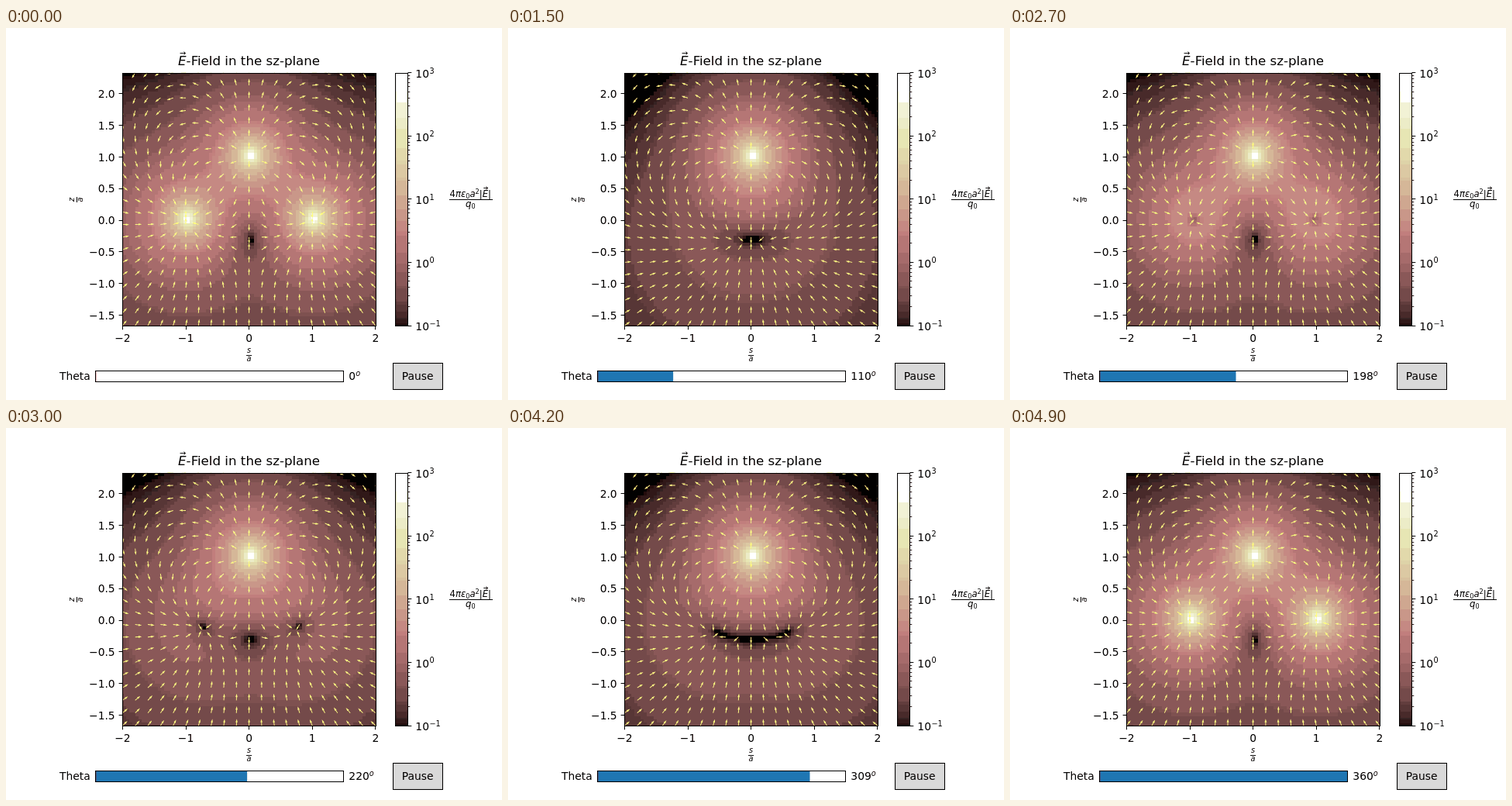
Animation, 640 px wide and 480 px high, one loop 5000 ms. Source, as an HTML page with a canvas:

```html
<!DOCTYPE html>
<html lang="en">
<head>
<meta charset="utf-8">
<title>E-Field in the sz-plane</title>
<style>
html, body { margin: 0; width: 640px; height: 480px; overflow: hidden; background: #fff }
canvas { display: block }
</style>
</head>
<body>
<canvas id="stage" width="640" height="480"></canvas>
<script>
const c = document.getElementById('stage').getContext('2d', { willReadFrequently: true });
const LEFT = 150.4, TOP = 57.6, SIZE = 326.4, BOTTOM = 384, UNIT = 81.6;
const STEPS = 50, NODES = 80, ARROWS = 21, Z0 = -5 / 3;
const FONT = '"DejaVu Sans", sans-serif';
const sx = s => LEFT + (s + 2) * UNIT;
const zy = z => BOTTOM - (z - Z0) * UNIT;
const clamp = v => Math.min(1, Math.max(0, v));

// Field of +1 at z=1 and -1 at x=+-1, projected on the plane turned by theta.
function field(s, z, theta) {
  let es = 0, ez = 0;
  const u = Math.cos(theta), v = Math.sin(theta);
  for (const [q, cs, cy, cz] of [[1, 0, 0, 1], [-1, u, v, 0], [-1, -u, -v, 0]]) {
    const ds = s - cs, dz = z - cz;
    const k = q / Math.pow(ds * ds + cy * cy + dz * dz, 1.5);
    es += k * ds;
    ez += k * dz;
  }
  return [es, ez];
}

// Pink colour map: root of a blend of grey and hot.
const pink = Array.from({ length: 256 }, (_, i) => {
  const x = i / 255;
  const hot = [0.0416 + 2.625 * x, 2.625 * (x - 0.365), (x - 0.746) / 0.254];
  return `rgb(${hot.map(h => Math.round(255 * Math.sqrt((2 * x + clamp(h)) / 3)))})`;
});
const shade = x => pink[Math.min(255, Math.floor(clamp(x) * 256))];

function text(str, x, y, size = 13.89, align = 'left', style = '') {
  c.font = `${style} ${size}px ${FONT}`;
  c.textAlign = align;
  c.fillStyle = '#000';
  c.fillText(str, x, y);
  return c.measureText(str).width;
}

function line(x1, y1, x2, y2, width = 1.11, color = '#000') {
  c.strokeStyle = color;
  c.lineWidth = width;
  c.beginPath();
  c.moveTo(x1, y1);
  c.lineTo(x2, y2);
  c.stroke();
}

function frame(x1, y1, x2, y2) {
  c.strokeStyle = '#000';
  c.lineWidth = 1.11;
  c.strokeRect(x1 + 0.5, y1 + 0.5, x2 - x1, y2 - y1);
}

function vector(x, y, length) {
  line(x, y, x + length, y, 0.9);
  line(x + length - 2.2, y - 2, x + length, y, 0.9);
  line(x + length - 2.2, y + 2, x + length, y, 0.9);
}

function heatmap(theta) {
  const step = 4 / (NODES - 1), px = step * UNIT;
  for (let j = 0; j < NODES - 1; j++) {
    const y1 = Math.round(BOTTOM - (j + 1) * px), y2 = Math.round(BOTTOM - j * px);
    for (let i = 0; i < NODES - 1; i++) {
      const x1 = Math.round(LEFT + i * px), x2 = Math.round(LEFT + (i + 1) * px);
      const e = Math.hypot(...field(-2 + i * step, Z0 + j * step, theta));
      c.fillStyle = shade((Math.log10(e) + 1) / 4);
      c.fillRect(x1, y1, x2 - x1, y2 - y1);
    }
  }
}

function arrows(theta) {
  const w = 0.06 / ARROWS * SIZE, len = SIZE / (1.8 * ARROWS);
  const half = [[0, 0.5 * w], [len - 4.5 * w, 0.5 * w], [len - 5 * w, 1.5 * w]];
  const shape = [...half, [len, 0], ...half.map(([x, y]) => [x, -y]).reverse()];
  c.save();
  c.beginPath();
  c.rect(LEFT, TOP, SIZE, SIZE);
  c.clip();
  c.fillStyle = '#ffff80';
  for (let j = 0; j < ARROWS; j++) {
    for (let i = 0; i < ARROWS; i++) {
      const s = -2 + 0.2 * i, z = Z0 + 0.2 * j;
      const [es, ez] = field(s, z, theta);
      const e = Math.hypot(es, ez), u = es / e, v = ez / e;
      c.beginPath();
      for (const [x, y] of shape) c.lineTo(sx(s) + x * u - y * v, zy(z) - x * v - y * u);
      c.fill();
    }
  }
  c.restore();
}

function axes() {
  frame(150, 58, 477, 384);
  for (let s = -2; s <= 2; s++) {
    const x = Math.round(sx(s) - 0.5) + 0.5;
    line(x, 384.5, x, 389.3);
    text(String(s).replace('-', '\u2212'), sx(s), 405, 13.89, 'center');
  }
  for (let z = -1.5; z <= 2; z += 0.5) {
    const y = Math.round(zy(z) - 0.5) + 0.5;
    line(145.6, y, 150.5, y);
    text(z.toFixed(1).replace('-', '\u2212'), 140.7, zy(z) + 5.2, 13.89, 'right');
  }
  const size = 16.67, label = '-Field in the sz-plane';
  c.font = `${size}px ${FONT}`;
  const eWidth = 0.632 * size;
  const x = 313.6 - (c.measureText(label).width + eWidth) / 2;
  text('E', x, 48, size, 'left', 'italic');
  text(label, x + eWidth, 48, size);
  vector(x + 2.5, 32.5, 7);
}

function fraction(x, y, top, angle) {
  c.save();
  c.translate(x, y);
  c.rotate(angle);
  text(top, 0, -3, 9.72, 'center', 'italic');
  line(-3.5, 0.5, 3.5, 0.5, 1);
  text('a', 0, 8, 9.72, 'center', 'italic');
  c.restore();
}

function colorbar() {
  for (let y = 58; y < 384; y++) {
    c.fillStyle = shade((BOTTOM - y - 0.5) / SIZE);
    c.fillRect(502, y, 16, 1);
  }
  frame(502, 58, 518, 384);
  for (let n = -1; n <= 3; n++) {
    const y = BOTTOM - (n + 1) * UNIT, ty = Math.round(y - 0.5) + 0.5;
    line(518.5, ty, 523.3, ty);
    const w = text('10', 528.3, y + 6.3);
    text(String(n).replace('-', '\u2212'), 528.8 + w, y + 1, 9.72);
    for (let k = 2; n < 3 && k < 10; k++) {
      const my = Math.round(y - Math.log10(k) * UNIT - 0.5) + 0.5;
      line(518.5, my, 521.3, my, 0.83);
    }
  }
  const big = 11.67, small = 8.17;
  let x = 572.5;
  const add = (str, y, size, style) => x += text(str, x, y, size, 'left', style);
  add('4', 218, big);
  add('π', 218, big, 'italic');
  add('ε', 218, big, 'italic');
  add('0', 220, small);
  add('a', 218, big, 'italic');
  add('2', 213.5, small);
  add('|', 218, big);
  vector(x + 1.5, 206.5, 5.5);
  add('E', 218, big, 'italic');
  add('|', 218, big);
  line(572, 221.5, 628, 221.5, 1);
  x = 593;
  add('q', 231, big, 'italic');
  add('0', 233, small);
}

function controls(turn) {
  c.fillStyle = '#1f77b4';
  c.fillRect(115.2, 442, 320 * turn, 14.4);
  line(116.5, 442, 116.5, 456, 1, 'rgba(255,0,0,.2)');
  frame(115, 442, 435, 456);
  text('Theta', 108.8, 453.5, 13.89, 'right');
  const w = text(String(Math.round(360 * turn)), 442.3, 453.5);
  text('o', 442.3 + w, 448.5, 9.72, 'left', 'italic');
  c.fillStyle = '#d9d9d9';
  c.fillRect(499, 432, 64, 34);
  frame(499, 432, 563, 466);
  text('Pause', 531.2, 453.5, 13.89, 'center');
}

// Reduce to a small palette: 3 bits red, 4 green, 3 blue, each bin drawn as its mean.
let basePalette = {};
function posterize() {
  const img = c.getImageData(0, 0, 640, 480), d = img.data;
  const sums = new Float64Array(4096), palette = {};
  const bin = i => (d[i] >> 5) << 7 | (d[i + 1] >> 4) << 3 | d[i + 2] >> 5;
  for (let i = 0; i < d.length; i += 4) {
    const k = bin(i) * 4;
    for (let n = 0; n < 3; n++) sums[k + n] += d[i + n];
    sums[k + 3]++;
  }
  for (let k = 0; k < 1024; k++) {
    const [r, g, b, count] = sums.subarray(4 * k, 4 * k + 4);
    if (count) palette[k] = basePalette[k] || [r / count, g / count, b / count];
  }
  for (let i = 0; i < d.length; i += 4) {
    const p = palette[bin(i)];
    for (let n = 0; n < 3; n++) d[i + n] = p[n];
  }
  c.putImageData(img, 0, 0);
  return palette;
}

function draw(step) {
  const turn = step / (STEPS - 1), theta = turn * 2 * Math.PI;
  c.fillStyle = '#fff';
  c.fillRect(0, 0, 640, 480);
  heatmap(theta);
  arrows(theta);
  axes();
  fraction(313.6, 422, 's', 0);
  fraction(91, 221.5, 'z', -Math.PI / 2);
  colorbar();
  controls(turn);
  return posterize();
}

basePalette = draw(0);
let shown = 0;
const start = performance.now();
function tick() {
  const step = Math.floor((performance.now() - start) / 100) % STEPS;
  if (step !== shown) draw(shown = step);
  requestAnimationFrame(tick);
}
requestAnimationFrame(tick);
</script>
</body>
</html>
```
